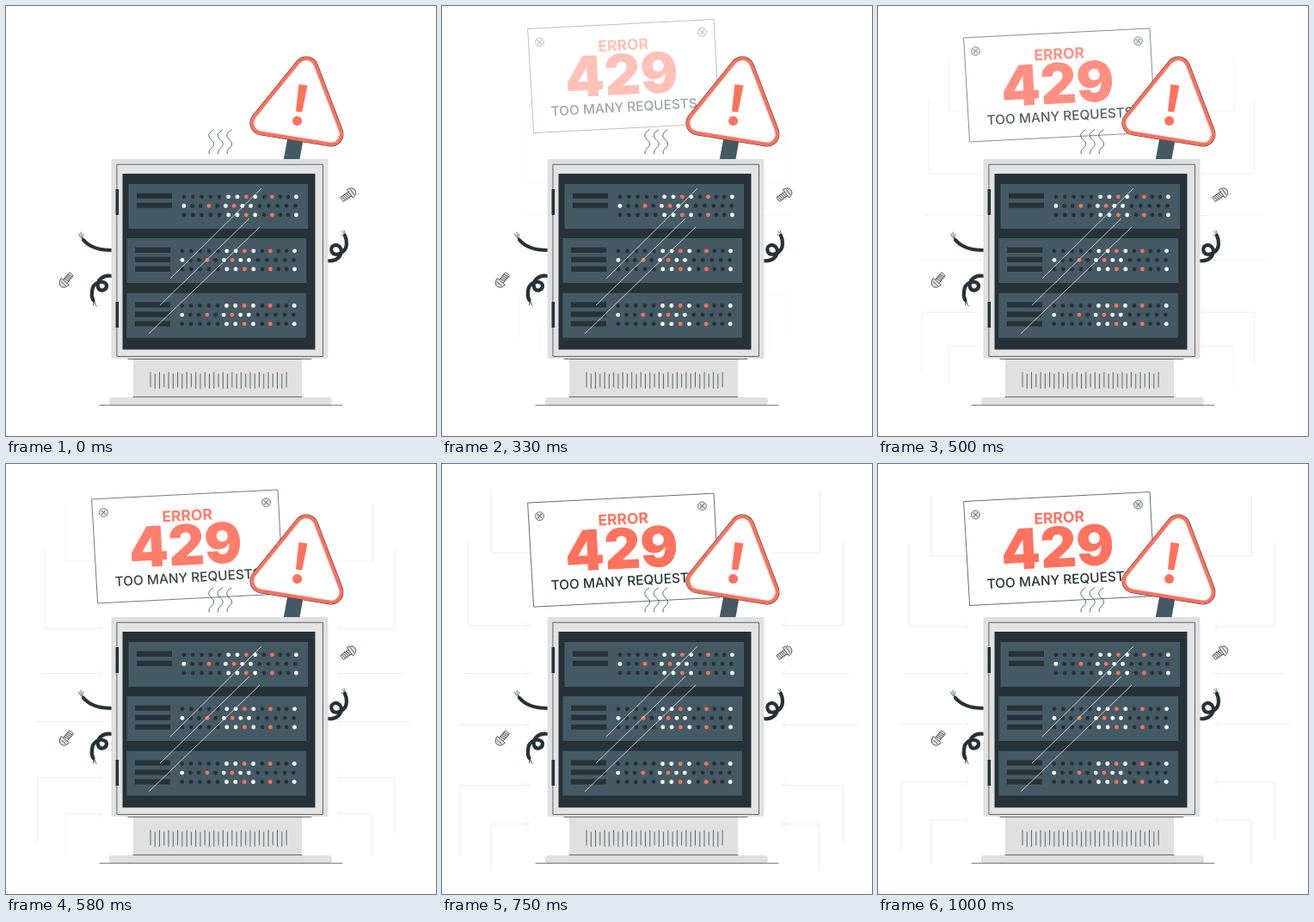
Write an HTML page that moves like this. It is 500x500 px and loops after 1040 ms.

```html
<!DOCTYPE html>
<html lang="en">
<head>
<meta charset="utf-8">
<title>Error 429</title>
<style>
html, body { margin: 0; width: 100%; height: 100%; overflow: hidden; background: #fff; }
svg { display: block; width: 100vw; height: 100vh; }
text { font-family: Inter, "Open Sans", sans-serif; text-anchor: middle; }
.thin { fill: none; stroke: #263238; stroke-width: .7; stroke-linecap: round; stroke-linejoin: round; }
.cable { fill: none; stroke: #263238; stroke-width: 4.2; stroke-linecap: round; }
.dark { fill: #263238; }
.slate { fill: #455a64; }
.grey { fill: #e0e0e0; }
.coral { fill: #ff725e; }
</style>
</head>
<body>
<svg viewBox="0 0 500 500">
  <defs>
    <g id="rivet">
      <circle r="5" fill="#e0e0e0" stroke="#263238" stroke-width=".6"/>
      <path class="thin" d="M-2.6-2.2L2.6 2.2M-2.2 2.6L2.2-2.6"/>
    </g>
    <g id="bolt">
      <path class="thin" style="fill:#e0e0e0" d="M-10-3H3V3H-10Z"/>
      <path class="thin" d="M-8.5-3l1.2 6m1-6l1.2 6m1-6l1.2 6m1-6l1.2 6"/>
      <path class="thin" style="fill:#e0e0e0" d="M1.500-6Q8.500-5 8.500 0T1.500 6Z"/>
      <path class="thin" d="M4.500-3.500V3.500"/>
    </g>
    <path id="tri" d="M349 73L298 136L378 149Z" stroke-linejoin="round"/>
  </defs>

  <g id="arrows" fill="none" stroke="#ececec" stroke-width=".9"></g>

  <g id="sign">
    <path class="thin" style="fill:#fff" d="M100 43.500L316 32.500L322.500 153.500L107 164.500Z"/>
    <use href="#rivet" x="113.500" y="59"/>
    <use href="#rivet" x="302.500" y="47.300"/>
    <text class="coral" transform="translate(211 68.500) rotate(-3)" font-size="17.500" font-weight="700">ERROR</text>
    <text class="coral" transform="translate(210 120) rotate(-3)" font-size="65" font-weight="900">429</text>
    <text class="dark" transform="translate(212 140) rotate(-3.300)" font-size="15.400" font-weight="500">TOO MANY REQUESTS</text>
  </g>

  <path class="slate" stroke="#263238" stroke-width=".5" d="M328 152L345.500 154L341 179H323Z"/>
  <use href="#tri" fill="#263238" stroke="#263238" stroke-width="29"/>
  <use href="#tri" class="coral" stroke="#ff725e" stroke-width="28"/>
  <use href="#tri" fill="#fff" stroke="#fff" stroke-width="19.500"/>
  <path class="coral" d="M340.500 91L350.500 92.500L344.300 123.600L337 122.400Z"/>
  <circle class="coral" cx="338.600" cy="133.600" r="5.500"/>

  <path class="cable" d="M123 284Q100 284 90 272"/>
  <path class="thin" d="M90 272Q85 269 84.500 265M90 272Q86 267 87 263M90 272Q88 268 89.500 265"/>
  <path class="cable" d="M123 314C112 312 105 320 107 327C109 333 117 331 117 325C116 318 100 319 100 333Q99 338 101.500 342"/>
  <path class="thin" d="M101.500 342Q102 346 105.500 349M101.500 342V348M101.500 342Q104 344 104 346"/>
  <path class="cable" d="M374 296C386 298 394 287 388 280C383 275 376 280 379 286C382 292 396 288 396 276Q396 271 394 267"/>
  <path class="thin" d="M394 267Q394 264 390.500 262M394 267Q392 266 390 266M394 267Q395 264 393 261"/>
  <use href="#bolt" transform="translate(399 219) rotate(-36)"/>
  <use href="#bolt" transform="translate(69.500 319.500) rotate(130)"/>

  <rect class="grey" x="148" y="409" width="196" height="47"/>
  <rect class="grey" x="120" y="455" width="259" height="9.500" rx="4"/>
  <path class="thin" d="M142 410.500H355M148 454.600H344M109 464.200H391"/>
  <path id="vents" class="thin"/>

  <rect class="grey" x="122.500" y="178" width="252" height="232" rx="2"/>
  <rect class="thin" style="fill:#e3e3e3" x="129.300" y="184.300" width="239.200" height="223.200"/>
  <rect class="dark" x="135.500" y="195" width="224" height="204.500"/>
  <path class="dark" d="M127.500 213h3.600v30h-3.600zM127.500 344h3.600v30h-3.600z"/>
  <g id="racks"></g>
  <path d="M297 212L191 317M283 247L179 348M295 257L166 381" fill="none" stroke="#fff" stroke-width=".7"/>
  <path id="steam" class="thin"/>
</svg>
<script>
const NS = "http://www.w3.org/2000/svg";
const $ = id => document.getElementById(id);

function add(parent, tag, attrs) {
  const node = document.createElementNS(NS, tag);
  for (const key in attrs) node.setAttribute(key, attrs[key]);
  parent.appendChild(node);
}

// Racks: bars on the left, three rows of lights (d dark, w white, o coral)
const LIGHTS = { d: "#263238", w: "#fff", o: "#ff725e" };
const outer = "dddddwwowdoddw", inner = "wddodwowwddddd";
[[142.5, 207, 2], [140.6, 270, 3], [140.3, 333.7, 3]].forEach(([x, y, bars]) => {
  const rack = $("racks");
  add(rack, "rect", { x, y, width: 208.6, height: 52, class: "slate" });
  for (let i = 0; i < bars; i++)
    add(rack, "rect", { x: x + 9.5, y: y + 10.7 + i * 11, width: 41, height: 6.2, class: "dark" });
  [outer, inner, outer].forEach((row, r) => [...row].forEach((light, i) => {
    const dx = r === 1 ? 9.7 * i + Math.max(0, i - 8) * .7 : 10.35 * i - Math.max(0, i - 9);
    add(rack, "circle", { cx: x + 64.4 + dx, cy: y + 14.8 + r * 10.6, r: 2.4, fill: LIGHTS[light] });
  }));
});

let vents = "";
for (let i = 0; i < 31; i++)
  vents += `M${168 + i * 5.27} ${i % 2 ? 428 : 426}V${i % 3 ? 444.5 : 443}`;
$("vents").setAttribute("d", vents);

$("steam").setAttribute("d", [241, 251.5, 262].map(x =>
  `M${x} 144q-9 5 -3 11q7 5 1 10q-4 3 -3 7`).join(""));

// Arrow line from a start path to its tip; dir 0 leaves out the head
function arrow(start, x, y, dir) {
  const head = dir ? `M${x - 4 * dir} ${y - 4}L${x} ${y}L${x - 4 * dir} ${y + 4}` : "";
  add($("arrows"), "path", { d: `M${start}L${x} ${y}${head}` });
}
arrow("62 37V107", 118, 107, 0);
arrow("36 92V189", 105, 189, 1);
arrow("32 243.5", 105, 243.5, 1);
arrow("25 302", 105, 302, 1);
arrow("27 450V370", 105, 370, 1);
arrow("62 465V414", 105, 414, 1);
arrow("434.5 37V107", 380, 107, 0);
arrow("461 92V189", 392, 189, -1);
arrow("472 243.5", 392, 243.5, -1);
arrow("479 302", 392, 302, -1);
arrow("461 438V370", 392, 370, -1);
arrow("433.5 465V414", 392, 414, -1);

const bezier = (s, a, b) => 3 * (1 - s) ** 2 * s * a + 3 * (1 - s) * s * s * b + s ** 3;

// Overshooting ease, cubic-bezier(.36, -.01, .5, 1.38)
function ease(x) {
  let lo = 0, hi = 1;
  for (let i = 0; i < 24; i++) {
    const mid = (lo + hi) / 2;
    if (bezier(mid, .36, .5) < x) lo = mid; else hi = mid;
  }
  return bezier(lo, -.01, 1.38);
}

const LOOP = 1040, FPS = 24;
const began = performance.now();

function draw() {
  const t = (performance.now() - began) % LOOP;
  let step = FPS;
  while (step > 0 && Math.round(step * 100 / FPS) * 10 > t) step--;
  const p = step ? ease(Math.min(1, step / FPS + .02)) : 0;
  const opacity = Math.max(0, Math.min(1, p));
  const scale = .5 + p / 2;
  $("sign").setAttribute("transform", `translate(0 ${30 * (p - 1)})`);
  $("arrows").setAttribute("transform", `translate(249 243.5) scale(${scale}) translate(-249 -243.5)`);
  $("sign").setAttribute("opacity", opacity);
  $("arrows").setAttribute("opacity", opacity);
  requestAnimationFrame(draw);
}
draw();
</script>
</body>
</html>
```
